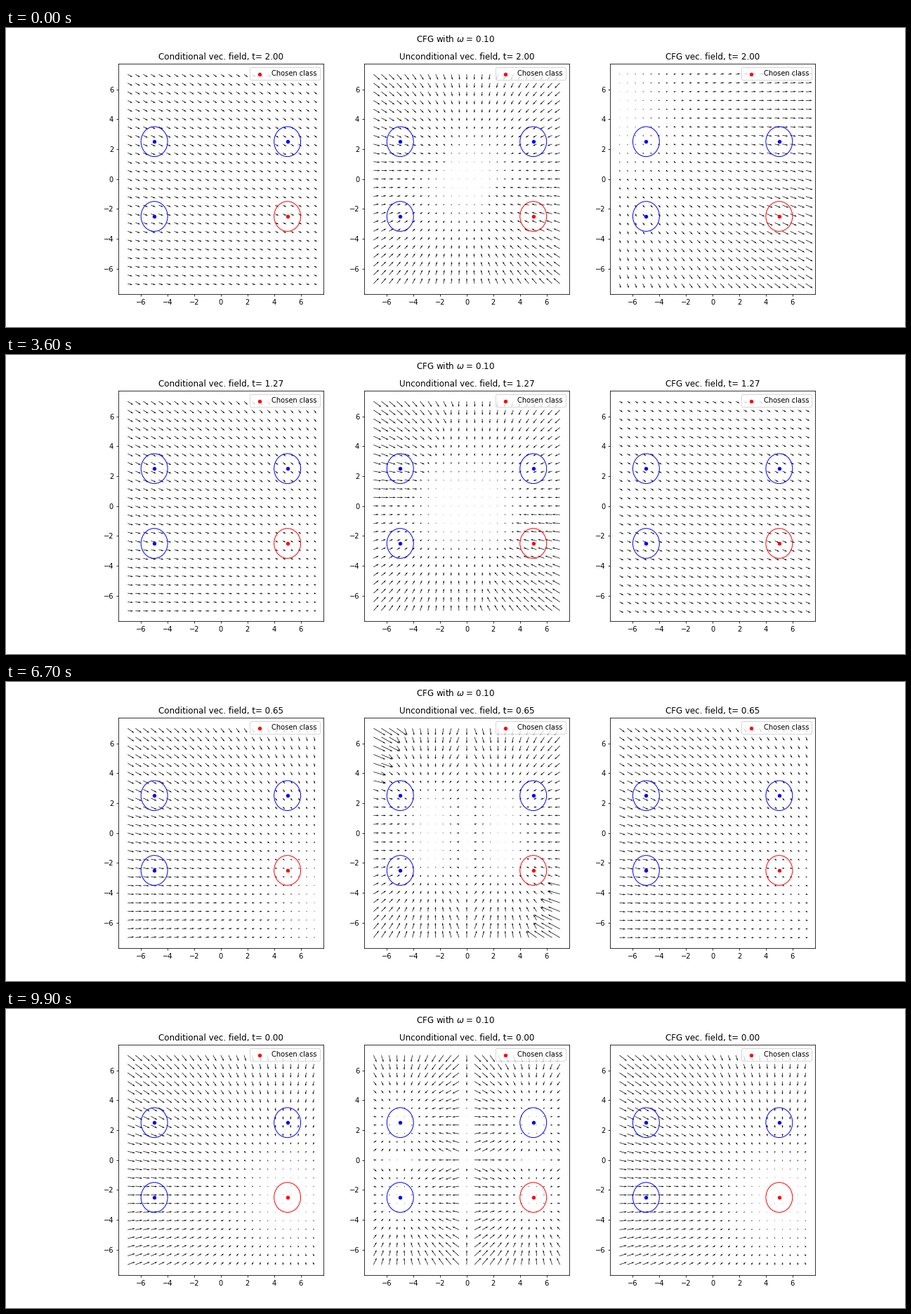
These frames come from a looping animation (1280x427 px, 10 s). A matplotlib script:

```python
import numpy as np
import matplotlib.pyplot as plt
from matplotlib.animation import FuncAnimation

DPI = 640 / 9
FRAMES, INTERVAL = 100, 100
OMEGA = 0.10
VAR = 0.01                      # variance of each class
CX, CY = 5.0, 2.5               # class centres lie at (+-CX, +-CY)
CHOSEN = (CX, -CY)
NAMES = ("Conditional", "Unconditional", "CFG")

axis = np.linspace(-7, 7, 25)
X, Y = np.meshgrid(axis, axis)
times = np.linspace(2, 0, FRAMES)


def conditional(t, gamma):
    """Flow towards the chosen class."""
    decay = np.exp(-t)
    return (X - (X - CHOSEN[0] * decay) / gamma,
            Y - (Y - CHOSEN[1] * decay) / gamma)


def unconditional(t, gamma):
    """Score of the four-class mixture."""
    decay = np.exp(-t)
    mean_x = CX * decay * np.tanh(CX * decay * X / gamma)
    mean_y = CY * decay * np.tanh(CY * decay * Y / gamma)
    # far out in the chosen class's diagonal the pull crosses over
    far = (X * Y < 0) & ((2 * abs(X) + abs(Y)) * np.exp(t) > 33)
    mean_x = np.where(far, -mean_x, mean_x)
    return (mean_x - X) / gamma, (mean_y - Y) / gamma


def fields(t):
    gamma = 1 + (VAR - 1) * np.exp(-2 * t)
    cond = conditional(t, gamma)
    free = unconditional(t, gamma)
    guided = [(1 + OMEGA) * c - OMEGA * u for c, u in zip(cond, free)]
    return cond, free, guided


def add_classes(ax):
    for cx in (-CX, CX):
        for cy in (-CY, CY):
            chosen = (cx, cy) == CHOSEN
            color = "red" if chosen else "blue"
            ax.scatter(cx, cy, s=20, color=color,
                       label="Chosen class" if chosen else None)
            ax.add_patch(plt.Circle((cx, cy), 1, fill=False, color=color))


fig, axes = plt.subplots(1, 3, figsize=(18, 6.0047), dpi=DPI)
fig.suptitle(rf"CFG with $\omega$ = {OMEGA:.2f}")

quivers = []
for ax, (u, v) in zip(axes, fields(times[0])):
    quivers.append(ax.quiver(X, Y, u, v))
    add_classes(ax)
    ax.set(xlim=(-7.7, 7.7), ylim=(-7.7, 7.7),
           xticks=range(-6, 7, 2), yticks=range(-6, 7, 2))
    ax.legend(loc="upper right")


def update(i):
    t = times[i]
    for ax, name, quiver, (u, v) in zip(axes, NAMES, quivers, fields(t)):
        quiver.scale = None     # rescale arrows to the current mean length
        quiver.set_UVC(u, v)
        ax.set_title(f"{name} vec. field, t= {t:.2f}")
    return quivers


anim = FuncAnimation(fig, update, frames=FRAMES, interval=INTERVAL,
                     repeat=True, repeat_delay=0)
plt.show()
```
